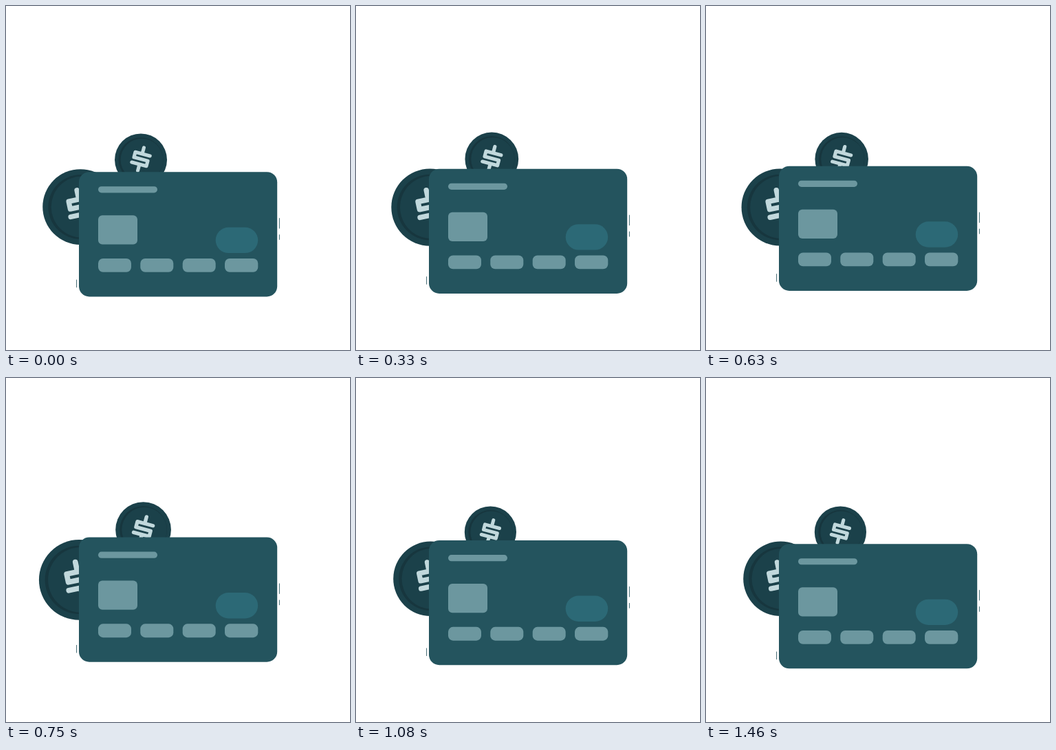
Animation, 500 px wide and 500 px high, one loop 1500 ms. Source, as an HTML page:

```html
<!DOCTYPE html>
<html lang="en">
<head>
<meta charset="utf-8">
<title>Card and coins</title>
<style>
  html, body { margin: 0; height: 100%; overflow: hidden; background: #fff; }
  svg { display: block; width: 100vw; height: 100vh; }
</style>
</head>
<body>
<svg viewBox="0 0 500 500">
  <defs>
    <g id="face">
      <circle r="37.6" fill="#1b414a"/>
      <circle r="32" fill="#17363e"/>
      <circle cx="1.4" r="30.5" fill="#1b414a"/>
    </g>
    <path id="dollar" fill="none" stroke="#c1d8dc" stroke-width="5" stroke-linecap="round" stroke-linejoin="round"
      d="M11.5-7.7H-10.3V0H10.3V7.7H-11.5M0-17V-7.7M0 7.7V17"/>
  </defs>
  <g id="coins">
    <g transform="translate(195.4 224)">
      <use href="#face"/>
      <use href="#dollar" transform="translate(0 -1) rotate(15)"/>
    </g>
    <g transform="translate(108.5 291.8) scale(1.444)">
      <use href="#face"/>
      <use href="#dollar" transform="rotate(-12)"/>
    </g>
  </g>
  <g id="card">
    <rect x="106" width="288.2" height="181.2" rx="15" fill="#24545e"/>
    <g fill="#6c979f">
      <rect x="134" y="21" width="86" height="9.2" rx="4.6"/>
      <rect x="134" y="63" width="57" height="42.3" rx="6"/>
      <rect x="134" y="125.8" width="48" height="19.8" rx="7"/>
      <rect x="195.3" y="125.8" width="48" height="19.8" rx="7"/>
      <rect x="256.7" y="125.8" width="48" height="19.8" rx="7"/>
      <rect x="318" y="125.8" width="48.3" height="19.8" rx="7"/>
    </g>
    <rect x="304.7" y="80.5" width="61.5" height="37.4" rx="18.7" fill="#2c6976"/>
    <path d="M397.4 67V82.3M397.4 91V98.6M102.6 156.5V168" stroke="#3f666f"/>
  </g>
</svg>
<script>
  const LOOP = 1500, FPS = 24, PHASE = 18;
  const PULSE = 296, PULSES = 3;
  const card = document.getElementById('card');
  const coins = document.getElementById('coins');

  // Linear 0 -> 1 -> 0 over one period
  const triangle = (t, period) => 1 - Math.abs(1 - 2 * (t % period) / period);

  function draw(now) {
    const step = Math.floor(((now % LOOP) + 4) * FPS / 1000) % 36;
    const t = step * 1000 / FPS + PHASE;
    const y = 241.45 - 10.15 * triangle(t, LOOP);
    const scale = t < PULSE * PULSES ? 1 + 0.091 * triangle(t, PULSE) : 1;
    card.setAttribute('transform', `translate(0 ${y})`);
    coins.setAttribute('transform', `translate(139 270) scale(${scale}) translate(-139 -270)`);
  }

  const start = performance.now();
  function tick() {
    draw(performance.now() - start);
    requestAnimationFrame(tick);
  }
  tick();
</script>
</body>
</html>
```
